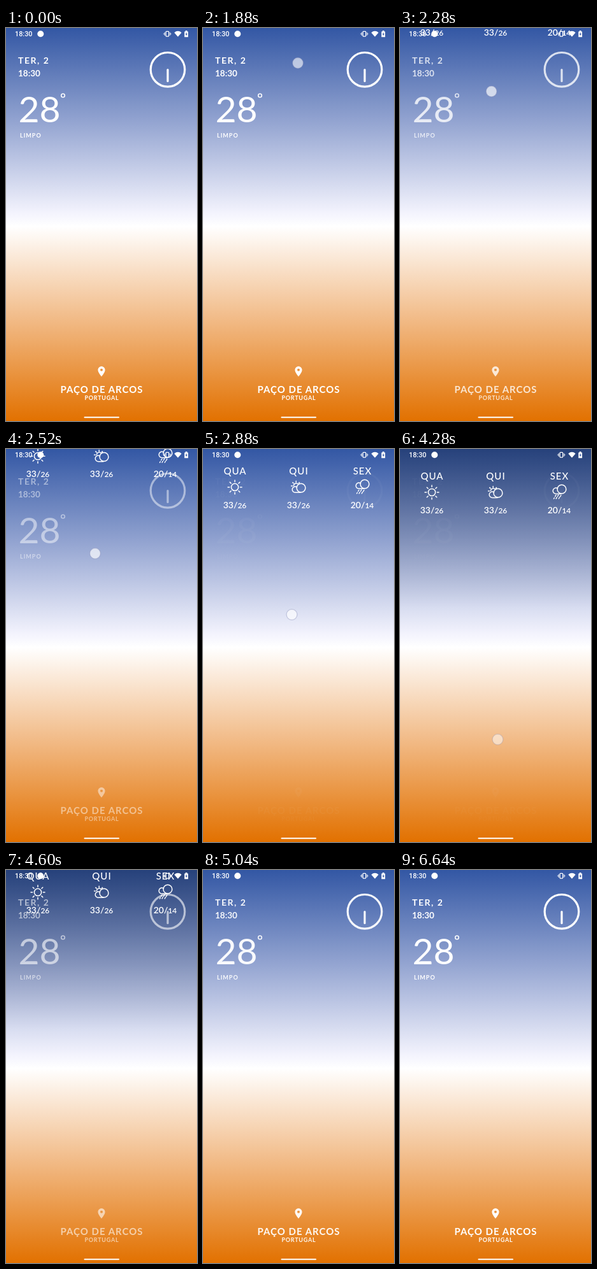
Animation of 300 by 617 pixels, one loop 8.12 s. Source, as an HTML page:

```html
<!DOCTYPE html>
<html lang="pt">
<head>
<meta charset="utf-8">
<title>Weather</title>
<style>
  html, body { margin: 0; width: 100%; height: 100%; overflow: hidden; }
  svg { display: block; width: 100vw; height: 100vh; font-family: Lato, "Open Sans", sans-serif; }
  .line { fill: none; stroke: #fff; stroke-linecap: round; }
  .bold { font-weight: 700; }
  .mid { text-anchor: middle; }
</style>
</head>
<body>
<svg viewBox="0 0 300 617" preserveAspectRatio="none" fill="#fff">
  <defs>
    <linearGradient id="sky" x2="0" y2="1">
      <stop stop-color="#3357a4"/>
      <stop offset=".25" stop-color="#98a8d3"/>
      <stop offset=".47" stop-color="#f3f3fd"/>
      <stop offset=".505" stop-color="#fff"/>
      <stop offset=".75" stop-color="#f1b882"/>
      <stop offset="1" stop-color="#e27100"/>
    </linearGradient>
    <linearGradient id="dusk" x2="0" y2="1">
      <stop stop-opacity=".25"/>
      <stop offset="1" stop-opacity="0"/>
    </linearGradient>
    <g id="cloud" class="line" stroke-width="1.5">
      <circle cx="4" cy="0" r="6.9"/>
      <path d="M-2.4 -1.3A4.7 4.7 0 1 0 -4.5 7.2H3"/>
    </g>
  </defs>

  <rect width="300" height="617" fill="url(#sky)"/>
  <rect id="shade" width="300" height="250" fill="url(#dusk)"/>

  <g id="today">
    <text class="bold" x="19" y="55.5" font-size="14" letter-spacing="1.5">TER, 2</text>
    <text class="bold" x="19" y="76" font-size="13.5">18:30</text>
    <text x="19.5" y="148" font-size="57">28</text>
    <circle class="line" cx="89.5" cy="106" r="2.8" stroke-width="1.5"/>
    <text class="bold" x="22" y="171.7" font-size="9" letter-spacing="1">LIMPO</text>
    <circle class="line" cx="254" cy="65.3" r="26.8" stroke-width="3.2"/>
    <path class="line" d="M254 65.5V83.5" stroke-width="3.2"/>
    <path transform="translate(140.4 529.6) scale(.8)" fill-rule="evenodd"
      d="M12 2C8.1 2 5 5.1 5 9c0 5.2 7 13 7 13s7-7.8 7-13c0-3.9-3.1-7-7-7zm0 4.5a2.5 2.5 0 0 1 0 5a2.5 2.5 0 0 1 0-5z"/>
    <text class="bold mid" x="150.5" y="573.3" font-size="15" letter-spacing="1">PAÇO DE ARCOS</text>
    <text class="bold mid" x="150.4" y="584.3" font-size="9" letter-spacing=".75">PORTUGAL</text>
  </g>

  <g id="forecast"></g>

  <g id="status">
    <text x="14" y="13.2" font-size="10.8" font-weight="500" font-family="Roboto, sans-serif">18:30</text>
    <circle cx="54.3" cy="9.2" r="5"/>
    <rect class="line" x="251.2" y="5.4" width="4.4" height="7.8" rx=".8" stroke-width="1.2"/>
    <path class="line" d="M249.5 7v4.6M257.3 7v4.6M248 8.2v2M258.8 8.2v2" stroke-width=".9"/>
    <path d="M264.3 7.2Q270 2.4 275.7 7.2L270 13.8z"/>
    <path d="M280.3 5.4h1.6V4h2.6v1.4h1.6v8.8h-5.8z"/>
    <path d="M283.7 6.8l-2 3.4h1.2v2.4l2-3.5h-1.2z" fill="#3a5ca6"/>
    <rect x="122.5" y="610.3" width="55.5" height="2" rx="1"/>
  </g>

  <circle id="touch" r="8.4" fill="#fff" fill-opacity=".68" stroke="#8087b5" stroke-opacity=".4" stroke-width="1.2"/>
</svg>

<script>
const LOOP = 8120, STEP = 40, TRAVEL = 112;
const $ = id => document.getElementById(id);

function rays(cx, cy, from, to, first, count) {
  let d = '';
  for (let i = 0; i < count; i++) {
    const a = (first + i * 45) * Math.PI / 180, c = Math.cos(a), s = Math.sin(a);
    d += `M${cx + from * c} ${cy + from * s}L${cx + to * c} ${cy + to * s}`;
  }
  return `<path class="line" stroke-width="1.5" d="${d}"/>`;
}

const icons = {
  sun: '<circle class="line" r="5.6" stroke-width="1.5"/>' + rays(0, 0, 8.4, 11, 0, 8),
  cloudy: '<use href="#cloud" y="1.2"/>'
    + '<path class="line" stroke-width="1.4" d="M-7.6 -2.2A4 4 0 0 1 -.6 -4.8"/>'
    + rays(-3.8, -2, 5.8, 7.6, 180, 4),
  rain: '<use href="#cloud" y="-4.8"/>'
    + '<path class="line" stroke-width="1.4" d="M-5 4.5l-1.3 2M-7.5 8.5l-1 1.6M-1 4l-1.5 2.4M-3.6 8l-1.3 2M3 4.5l-1.5 2.4M.5 8l-1.2 2"/>'
};

const days = [
  ['QUA', 'sun', 33, 26],
  ['QUI', 'cloudy', 33, 26],
  ['SEX', 'rain', 20, 14]
];

$('forecast').innerHTML = days.map(([name, icon, high, low], i) => `
  <g transform="translate(${50 + i * 100} 68)">
    <text class="mid" x=".5" y="-19.7" font-size="15" font-weight="500" letter-spacing="1">${name}</text>
    ${icons[icon]}
    <text class="mid" y="33.2" font-size="14" font-weight="600">${high}/<tspan font-size="12">${low}</tspan></text>
  </g>`).join('');

// Linear interpolation through [time, value] points.
function track(t, points) {
  let [t0, v0] = points[0];
  for (const [t1, v1] of points) {
    if (t < t1) return t <= t0 ? v0 : v0 + (v1 - v0) * (t - t0) / (t1 - t0);
    [t0, v0] = [t1, v1];
  }
  return v0;
}

const pullDown = [[1920, 55], [2080, 68], [2240, 90], [2400, 128], [2520, 164],
  [2680, 212], [2800, 244], [2880, 260], [3000, 272], [3120, 276]];
const pushUp = [[4040, 462], [4280, 456], [4400, 420], [4520, 350]];
const panelExit = [[4280, 1], [4440, .9], [4600, .705], [4720, .4], [4840, 0]];
const todayReturn = [[4240, 0], [4280, .03], [4440, .3], [4600, .6], [4840, .88], [5200, 1]];
const shadeLevel = [[4000, 0], [4160, 1], [4720, 1], [4840, 0]];
const touchLevel = [[1879, 0], [1880, .9], [2000, 1], [3040, 1], [3200, 0],
  [4000, 0], [4120, .75], [4440, .75], [4560, 0]];

function draw(t) {
  const leaving = t >= 4000;
  const fingerY = track(t, leaving ? pushUp : pullDown);
  const fingerX = leaving ? 153.5 : track(t, [[1920, 149], [2520, 140], [2880, 139.5]]);
  const open = leaving ? track(t, panelExit) : Math.min(1, (fingerY - 55) / 221);
  const today = leaving ? track(t, todayReturn) : Math.max(0, 1 - 1.04 * open);

  $('today').setAttribute('opacity', today);
  $('forecast').setAttribute('transform', `translate(0 ${-TRAVEL * (1 - open)})`);
  $('forecast').setAttribute('visibility', open > 0 ? 'visible' : 'hidden');
  $('shade').setAttribute('opacity', track(t, shadeLevel));
  $('touch').setAttribute('transform', `translate(${fingerX} ${fingerY})`);
  $('touch').setAttribute('opacity', track(t, touchLevel));
}

const start = performance.now();
function tick() {
  const t = (performance.now() - start) % LOOP;
  draw(Math.floor(t / STEP) * STEP);
  requestAnimationFrame(tick);
}
tick();
</script>
</body>
</html>
```
